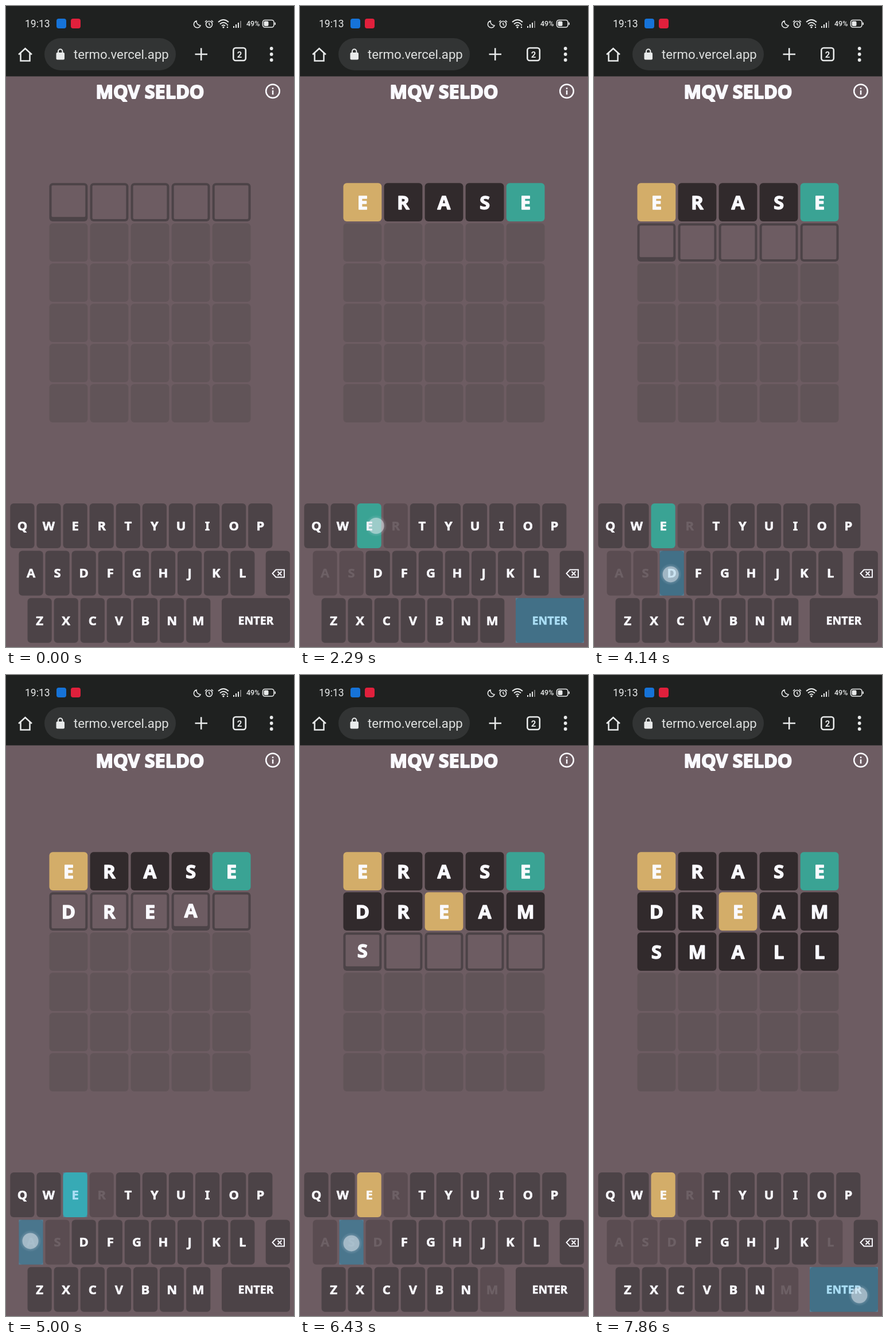
An HTML page with a canvas that plays this animation: 502x1116 px, repeating every 8000 ms.

```html
<!DOCTYPE html>
<html lang="pt">
<head>
<meta charset="utf-8">
<title>Word game</title>
<style>
html, body { margin: 0; width: 100%; height: 100%; overflow: hidden; background: #6d5c62; }
canvas { display: block; }
</style>
</head>
<body>
<canvas id="stage" width="502" height="1116"></canvas>
<script>
const c = document.getElementById('stage').getContext('2d');
const LOOP = 8000, STEPS_PER_MS = 0.007;
const PAGE = '#6d5c62', IDLE = '#615458', EDGE = '#4c4347', MISS = '#312a2c',
      NEAR = '#d3ad69', HIT = '#3aa394', INK = '#fafaff', ICON = '#e8eaea';
const GAME = '"Noto Sans", "Open Sans", sans-serif', UI = 'Roboto, sans-serif';

// Each guess: word, result per letter, and the step at which each key (then ENTER) is touched
const guesses = [
  { word: 'ERASE', marks: 'y---g', taps: [1, 4, 7, 10.1, 11.7, 13] },
  { word: 'DREAM', marks: '--y--', taps: [28.5, 30.2, 32, 33.7, 35.5, 40.6] },
  { word: 'SMALL', marks: '-----', taps: [43.5, 45.2, 47, 48.9, 49.5, 54.1] }
];
const markColor = { y: NEAR, g: HIT, '-': MISS };

// Moments counted in steps after a touch
const PRESS = 0.5, REVEAL = 0.8, TYPED = 1.1, SETTLED = 2.1, NEXT_ROW = 3.3, RELEASE = 3.5;

const keys = {};
['QWERTYUIOP', 'ASDFGHJKL', 'ZXCVBNM'].forEach((row, r) =>
  [...row].forEach((k, i) => {
    keys[k] = { x: 7.3 + 15.1 * r + 46.1 * i, y: 866 + 82.4 * r, w: 42.2 };
  }));
keys.DEL = { x: 452.7, y: 948.4, w: 42.2 };
keys.ENTER = { x: 376, y: 1030.8, w: 119 };
const KEY_H = 78;
const touchOffset = { E: [12, 0], D: [-2, 2], L: [-2, 7], A: [-1, -2], ENTER: [27, 10] };

function box(x, y, w, h, r, fill) {
  c.beginPath();
  c.roundRect(x, y, w, h, r);
  c.fillStyle = fill;
  c.fill();
}

function line(path, width = 2, color = ICON) {
  c.strokeStyle = color;
  c.lineWidth = width;
  c.stroke(new Path2D(path));
}

function disc(x, y, r, fill) {
  c.beginPath();
  c.arc(x, y, r, 0, 7);
  c.fillStyle = fill;
  c.fill();
}

function ring(x, y, r, width, color = ICON) {
  c.beginPath();
  c.arc(x, y, r, 0, 7);
  c.strokeStyle = color;
  c.lineWidth = width;
  c.stroke();
}

// Places capitals so that y is their vertical middle
function text(s, x, y, size, font, weight, align, color) {
  c.font = `${weight} ${size}px ${font}`;
  c.textAlign = align;
  c.fillStyle = color;
  c.fillText(s, x, y + size * 0.357);
}

// Heavy, soft-cornered lettering of the game
function label(s, x, y, size, heft = 0.04, color = INK) {
  text(s, x, y, size, GAME, 700, 'center', color);
  c.strokeStyle = color;
  c.lineWidth = size * heft;
  c.lineJoin = 'round';
  c.strokeText(s, x, y + size * 0.357);
  c.lineJoin = 'miter';
}

function statusBar(step) {
  text('19:13', 33, 31, 17.5, UI, 400, 'left', ICON);
  box(88, 22, 17, 17, 4, '#1673d8');
  box(113, 22, 17, 17, 4, '#e0203c');
  line('M332 26A6 6 0 1 0 339 34A7 7 0 0 1 332 26Z', 1.5);
  ring(354, 32, 5.5, 1.6);
  line('M354 29V32L356 34M347 28L350 25M358 25L361 28', 1.5);
  line('M370 28Q379 20 388 28M373 31.5Q379 26 385 31.5M376 34.5Q379 32 382 34.5', 2);
  disc(379, 37, 1.6, ICON);
  if (step < 38) {
    disc(386, 33, 1.2, ICON);
    disc(386, 37, 1.2, ICON);
  }
  for (let i = 0; i < 4; i++)
    box(396 + 4 * i, 35 - 3 * i, 2, 3 + 3 * i, 0, i < 3 ? ICON : '#777');
  text('49%', 419, 31, 12.5, UI, 500, 'left', ICON);
  c.beginPath();
  c.roundRect(447.5, 24.5, 19.5, 12.5, 4);
  c.strokeStyle = ICON;
  c.lineWidth = 1.6;
  c.stroke();
  box(449.5, 26.5, 8, 8.5, 2, ICON);
  box(468.3, 28.5, 1.7, 4.5, 1, ICON);
}

function browserBar() {
  line('M22 84.5L33.5 74L45 84.5M25.5 82V95.5H41.5V82', 2.5);
  box(67, 56, 229, 56, 28, '#323434');
  box(87.5, 81, 14.5, 12.5, 2, ICON);
  line('M91 82V79A3.7 3.7 0 0 1 98.4 79V82', 2);
  text('termo.vercel.app', 118, 84.5, 22.2, UI, 400, 'left', '#dfe1e0');
  line('M329.5 84H351M340.2 73.3V94.7', 2.6);
  c.beginPath();
  c.roundRect(396.3, 73, 21.5, 22, 4);
  c.strokeStyle = ICON;
  c.lineWidth = 2.6;
  c.stroke();
  text('2', 407, 84.2, 15, UI, 700, 'center', ICON);
  [74, 84, 94].forEach(y => disc(462.7, y, 2.9, ICON));
}

function header(step) {
  box(0, 0, 502, 122.5, 0, '#1f2120');
  statusBar(step);
  browserBar();
  label('MQV SELDO', 251, 149, 32.3, 0.06);
  ring(465, 148.3, 11.8, 2.5, INK);
  box(463.8, 146.8, 2.5, 7.5, 0, INK);
  box(463.8, 142.2, 2.5, 2.6, 0, INK);
}

function tileRow(row, step) {
  const guess = guesses[row];
  const age = i => step - guess.taps[i];
  const active = guess && (row === 0 || step - guesses[row - 1].taps[5] >= NEXT_ROW);
  const shown = guess && age(5) >= REVEAL;
  const cursor = active ? [0, 1, 2, 3, 4].filter(i => age(i) >= SETTLED).length : -1;
  for (let i = 0; i < 5; i++) {
    const x = 75.5 + 71.05 * i, y = 308.2 + 70 * row;
    box(x, y, 66.8, 66.8, 6, shown ? markColor[guess.marks[i]] : active ? EDGE : IDLE);
    if (!active) continue;
    const under = i === cursor && !shown;
    if (!shown) box(x + 4, y + 4, 58.8, under ? 55 : 58.8, 2, PAGE);
    if (age(i) >= TYPED) label(guess.word[i], x + 33.4, y + (under ? 32 : 33.9), 33);
  }
}

function keyboard(step) {
  const state = {};
  for (const g of guesses)
    if (step - g.taps[5] >= REVEAL)
      [...g.word].forEach((k, i) => { state[k] = g.marks[i]; });
  for (const [name, k] of Object.entries(keys)) {
    const dim = state[name] === '-';
    const cx = k.x + k.w / 2, cy = k.y + KEY_H / 2;
    box(k.x, k.y, k.w, KEY_H, 6, dim ? '#5a4c51' : state[name] ? markColor[state[name]] : EDGE);
    if (name === 'DEL') {
      line('M464.5 988L470.5 981.5H485V994.5H470.5ZM473.5 984.5L480.5 991.5M480.5 984.5L473.5 991.5', 1.9, INK);
    } else {
      label(name, cx, cy, name === 'ENTER' ? 19.5 : 22, 0.03, dim ? '#6d6065' : INK);
    }
  }
}

function touches(step) {
  const taps = guesses.flatMap((g, row) => g.taps.map((at, i) => ({
    name: g.word[i] || 'ENTER',
    age: step - at,
    hold: row === 0 && i === 4 ? 4.6 : 2
  })));
  const pressed = new Set(taps.filter(t => t.age >= PRESS && t.age < RELEASE).map(t => t.name));
  for (const name of pressed) {
    const k = keys[name];
    box(k.x, k.y, k.w, KEY_H, 0, 'rgba(51,181,229,.4)');
  }
  for (const { name, age, hold } of taps) {
    if (age < 0 || age >= hold + 1) continue;
    const k = keys[name], [dx, dy] = touchOffset[name] || [0, 2];
    const x = k.x + k.w / 2 + dx, y = k.y + KEY_H / 2 + dy;
    c.globalAlpha = age < hold ? 1 : 0.2;
    const halo = c.createRadialGradient(x, y, 13, x, y, 19);
    halo.addColorStop(0, 'rgba(200,210,225,.25)');
    halo.addColorStop(1, 'rgba(200,210,225,0)');
    disc(x, y, 19, halo);
    disc(x, y, 14, 'rgba(235,240,245,.45)');
    c.globalAlpha = 1;
  }
}

function draw(now) {
  const step = Math.floor((now % LOOP + 4) * STEPS_PER_MS) % 56;
  box(0, 0, 502, 1116, 0, PAGE);
  header(step);
  for (let row = 0; row < 6; row++) tileRow(row, step);
  keyboard(step);
  touches(step);
}

const start = performance.now();
function tick() {
  draw(performance.now() - start);
  requestAnimationFrame(tick);
}
tick();
</script>
</body>
</html>
```
